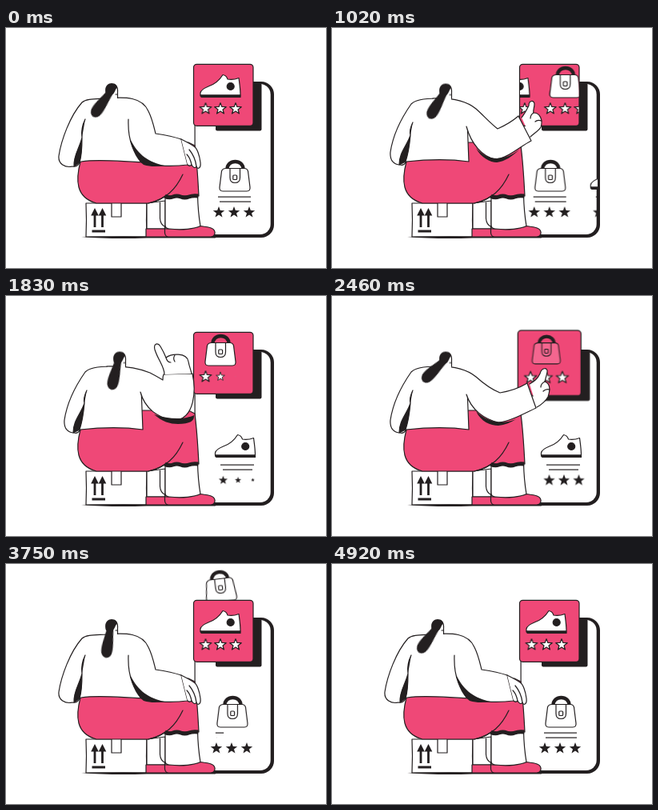
An HTML page without scripts that plays this animation: 400 px wide and 300 px high, repeating every 4.95 s.

```html
<!DOCTYPE html>
<html lang="en">
<head>
<meta charset="utf-8">
<title>Shopping by phone</title>
<style>
html, body { margin: 0; width: 100%; height: 100%; overflow: hidden; background: #fff; }
svg { display: block; width: 100vw; height: 100vh; --pink: #ef4877; --ink: #231f20; }
.o { stroke: var(--ink); stroke-width: 1.2; stroke-linejoin: round; stroke-linecap: round; }
.w { fill: #fff; }
.p { fill: var(--pink); }
.k { fill: var(--ink); }
.n { fill: none; }
.a { animation: 4.95s ease-in-out infinite both; }
.box { transform-box: fill-box; transform-origin: center; }
.d1 { animation-delay: .1s; }
.d2 { animation-delay: .2s; }
.q1 { animation-delay: .04s; }
.q2 { animation-delay: .08s; }

/* person */
.torso { animation-name: torso; }
@keyframes torso {
  0%, 4%, 74%, 100% { d: path("M127 88C112 89 101 88 95 93C80 110 69 140 66 160C65 170 74 175 83 173C88 174 90 172 92 168L94 167C120 163 150 168 178 168L172 110C168 97 155 90 127 88Z"); }
  20%, 54% { d: path("M130 88C115 88 104 90 99 95C85 115 76 135 73 155C72 166 78 171 85 171C89 172 91 170 92 168L93 167C120 164 150 164 171 167L169 115C168 100 158 91 130 88Z"); }
  64.2% { d: path("M128 88C114 88 103 90 97 96C85 112 77 138 75 160C74 172 78 178 86 178C90 178 92 174 93 170L94 170C120 161 150 163 174 174L169 112C168 98 157 90 128 88Z"); }
}
.fold { animation-name: fold; }
@keyframes fold {
  0%, 4%, 74%, 100% { d: path("M99 114C95 122 94 130 95 137C92 150 84 160 85 173L92 168C95 158 95 148 95 137"); }
  20%, 54% { d: path("M101 118C98 124 97 130 98 134C94 147 84 155 84 171L92 167C96 155 97 145 98 134"); }
  64.2% { d: path("M98 120C95 126 94 136 95 144C92 152 84 162 84 177L92 169C95 160 95 152 95 144"); }
}
.head { animation-name: head; }
@keyframes head {
  0%, 4%, 74%, 100% { transform: none; }
  20%, 54% { transform: translate(10px, .5px); }
  64.2% { transform: translate(6.5px, 4px); }
}
.tail { animation-name: tail; }
@keyframes tail {
  0%, 100% { transform: rotate(35deg); }
  10% { transform: rotate(14deg); }
  20.6% { transform: rotate(30deg); }
  37% { transform: rotate(13deg); }
  49.7% { transform: rotate(45deg); }
  64.2% { transform: rotate(49deg); }
  75.8% { transform: rotate(8deg); }
  88% { transform: rotate(30deg); }
}
.sleeve { animation-name: sleeve; }
@keyframes sleeve {
  0%, 3%, 72.7%, 100% { d: path("M125 88C150 86 170 86 178 104C183 114 185 124 187 132C200 134 210 136 219 139L227 171C205 174 180 172 172 168C160 158 152 140 153 114"); }
  12.1% { d: path("M126 88C150 87 168 91 181 101C192 110 204 117 214 122C230 120 246 114 258 107L266 135C245 145 222 160 206 162C188 158 174 144 168 123"); }
  20.6% { d: path("M126 88C150 87 168 91 180 101C190 110 198 119 207 126C216 122 225 117 233 110L249 141C235 148 220 163 204 164C188 161 174 145 168 123"); }
  28.3%, 39.4% { d: path("M126 88C150 87 168 91 180 96C186 99 191 102 196 105C196 102 196 100 197 98L233 97C237 115 238 155 208 156C190 151 174 142 168 120"); }
  45.5%, 53.5% { d: path("M126 88C150 87 168 91 180 101C190 110 200 117 210 121C222 119 234 115 244 109L255 140C240 147 222 157 208 158C190 154 174 142 168 123"); }
  64.2% { d: path("M125 88C150 87 170 92 179 107C184 115 187 123 189 133C202 131 215 128 229 123L237 158C222 164 205 173 190 174C178 171 171 148 168 122"); }
}
.shade { animation-name: shade; }
@keyframes shade {
  0%, 3%, 72.7%, 100% { d: path("M155 138C158 155 165 166 172 171C182 174 190 173 198 172C180 168 165 160 155 138Z"); }
  12.1%, 20.6% { d: path("M180 150C186 162 198 168 206 168C216 167 226 160 234 152C216 166 196 168 180 150Z"); }
  28.3%, 39.4% { d: path("M185 148C195 157 205 160 215 160C230 160 236 156 235 149C225 154 205 155 185 148Z"); }
  45.5%, 53.5% { d: path("M180 144C186 157 198 162 208 162C216 161 224 158 230 154C216 160 196 160 180 144Z"); }
  64.2% { d: path("M173 155C176 168 182 177 188 178C196 178 202 174 208 170C196 174 182 174 173 155Z"); }
}
.hand { animation-name: hand; }
@keyframes hand {
  0%, 3%, 72.7%, 100% { d: path("M219 139C225 142 231 145 235 148C239 150 242 160 243 168C244 176 239 177 238 173C237 176 233 174 232 171C230 173 228 172 227 171"); }
  12.1% { d: path("M259 108C261 104 264 101 267 97C270 90 276 91 275 96C274 100 272 103 272 106C280 106 284 115 280 124C277 128 271 131 266 133"); }
  20.6% { d: path("M237 112C241 107 244 101 246 97C246 90 253 90 253 95C253 100 251 103 252 106C260 106 264 115 261 124C259 128 252 132 248 136"); }
  28.3%, 39.4% { d: path("M198 98C198 88 190 80 186 67C184 59 190 58 193 63C196 68 198 72 200 77C206 72 226 70 228 82C229 88 231 92 232 97"); }
  45.5%, 53.5% { d: path("M247 110C252 107 257 104 260 97C262 89 270 89 269 95C268 100 267 103 266 107C274 110 272 120 270 126C268 130 262 136 256 139"); }
  64.2% { d: path("M231 126C234 122 238 119 240 117C244 111 249 115 246 120C244 123 243 126 244 129C252 130 254 140 252 150C250 157 243 160 238 163"); }
}
.knuckle { animation-name: knuckle; }
@keyframes knuckle {
  0%, 3%, 72.7%, 100% { d: path("M229 152C234 158 237 165 238 173M226 158C230 162 231 166 232 171"); }
  12.1% { d: path("M272 106C269 108 267 110 267 113M281 116C278 115 275 115 273 117"); }
  20.6% { d: path("M252 106C249 108 248 110 248 113M262 116C259 115 256 115 254 117"); }
  28.3%, 39.4% { d: path("M200 77C201 81 203 83 206 83M211 74C209 77 209 79 211 82"); }
  45.5%, 53.5% { d: path("M266 107C262 109 261 111 261 114M272 117C269 116 266 117 264 119"); }
  64.2% { d: path("M244 129C241 128 239 128 237 130M252 139C248 137 245 138 242 140"); }
}
.crate { animation-name: crate; }
@keyframes crate {
  0%, 60%, 71%, 100% { d: path("M100 219Q101 240 100 261L176 261Q175 240 176 219Z"); }
  64.2% { d: path("M101 220Q95 240 100 261L176 261Q182 240 175 220Z"); }
}

/* card */
.card { transform-origin: 272px 84px; animation-name: press; }
@keyframes press {
  0%, 44.5%, 55%, 80%, 88%, 100% { transform: none; }
  48.5%, 51.7% { transform: scale(1.06); }
  84% { transform: scale(1.025); }
}
.shoe { animation-name: shoe; transform-origin: 268px 75px; }
@keyframes shoe {
  0%, 12.1% { transform: none; animation-timing-function: ease-in; }
  20.6% { transform: translate(-46px); animation-timing-function: ease-out; }
  27%, 67% { transform: translate(-69px); animation-timing-function: step-end; }
  67.1% { transform: scale(0); }
  73.5%, 100% { transform: none; }
}
.rateA { animation-name: rateA; }
@keyframes rateA {
  0%, 12.1% { transform: none; animation-timing-function: ease-in; }
  20.6% { transform: translate(-46px); animation-timing-function: ease-out; }
  27%, 66% { transform: translate(-69px); animation-timing-function: step-end; }
  66.1%, 100% { transform: none; }
}
.bag { animation-name: bag; }
@keyframes bag {
  0%, 12.1% { transform: translate(69px); animation-timing-function: ease-in; }
  20.6% { transform: translate(23.5px); animation-timing-function: ease-out; }
  27%, 65.3% { transform: none; animation-timing-function: step-end; }
  65.4%, 100% { transform: translate(69px); }
}
.rateB { animation-name: rateB; }
@keyframes rateB {
  0%, 12.1% { transform: translate(69px); animation-timing-function: ease-in; }
  20.6% { transform: translate(23.5px); animation-timing-function: ease-out; }
  27%, 72% { transform: none; animation-timing-function: step-end; }
  72.1%, 100% { transform: translate(69px); }
}
.tint { animation-name: tint; transform-origin: 268px 70px; }
@keyframes tint {
  0%, 45.5%, 57%, 100% { fill: #fff; transform: none; }
  48.5%, 52% { fill: #f4668f; transform: scale(.87); }
}
.wave { animation-name: wave; }
@keyframes wave {
  0%, 30.3%, 36.4%, 61.2%, 95%, 100% { transform: none; }
  32.3%, 66.7%, 94% { transform: scale(0); }
}
.blink { animation-name: blink; }
@keyframes blink {
  0%, 31%, 39%, 100% { transform: none; }
  33% { transform: scale(0); }
}
.pop { animation-name: pop; }
@keyframes pop {
  0%, 30%, 71.2%, 100% { transform: none; }
  31%, 68.7% { transform: scale(0); }
}
.rise { animation-name: rise; transform-origin: 268px 70px; }
@keyframes rise {
  0%, 65.2% { visibility: hidden; transform: none; }
  65.3% { visibility: visible; transform: none; animation-timing-function: ease-out; }
  70.7% { visibility: visible; transform: translateY(-45px) rotate(-4deg); animation-timing-function: step-end; }
  70.8%, 100% { visibility: hidden; transform: none; }
}
.drop { animation-name: drop; transform-origin: 268px 70px; }
@keyframes drop {
  0%, 70.6% { visibility: hidden; transform: translateY(-45px) rotate(-4deg); }
  70.7% { visibility: visible; transform: translateY(-45px) rotate(-4deg); animation-timing-function: ease-in; }
  75.8% { visibility: visible; transform: translateY(-40px) rotate(-7deg); animation-timing-function: ease-in; }
  80.8% { visibility: visible; transform: translateY(4px); animation-timing-function: step-end; }
  80.9%, 100% { visibility: hidden; transform: none; }
}

/* phone list */
.first { animation-name: first; }
@keyframes first {
  0%, 16.2% { transform: none; animation-timing-function: ease-in; }
  20.6% { transform: translate(-13px); animation-timing-function: ease-out; }
  30.3%, 66.7% { transform: translate(-77px); animation-timing-function: cubic-bezier(.4, 0, .2, 1); }
  78.8%, 100% { transform: none; }
}
.second { animation-name: second; }
@keyframes second {
  0%, 16.2% { transform: translate(77px); animation-timing-function: ease-in; }
  20.6% { transform: translate(62px); animation-timing-function: ease-out; }
  30.3%, 66.7% { transform: none; animation-timing-function: cubic-bezier(.4, 0, .2, 1); }
  78.8%, 100% { transform: translate(77px); }
}
.line { transform-box: fill-box; transform-origin: left; animation-name: line; }
@keyframes line {
  0%, 40%, 80%, 100% { transform: none; }
  41%, 73.5% { transform: scaleX(0); }
}
</style>
</head>
<body>
<svg viewBox="0 0 400 300">
  <defs>
    <path id="star" d="M0-7.400L1.900-2.500L7.200-2.300L3 1L4.500 6L0 3.100L-4.500 6L-3 1L-7.200-2.300L-1.900-2.500Z"/>
    <g id="sneaker" class="o">
      <path class="w" d="M243 84V81C244 77 248 75 253 73C262 70 267 65 271 58.5C274 59 276 61 277 64C282 65 287 64 291 62.5C292 70 293 76 293 84Z"/>
      <path class="k" d="M243 84H293V86.5H244.500Q243 86 243 84Z"/>
      <circle class="k" cx="280.700" cy="73" r="4.500"/>
    </g>
    <g id="purse" class="o">
      <path class="n" style="stroke-width:4.500;stroke-linecap:butt" d="M258.500 60C258 46.500 279 46.500 278.500 60"/>
      <path d="M257 58.500H280Q283.500 58.500 284.500 62L287 82Q287.500 87 283 87H253Q248.500 87 249 82L251.500 62Q252.500 58.500 257 58.500Z"/>
      <path class="n" d="M262 58.500V70Q262 76.500 268.200 76.500Q274.500 76.500 274.500 70V58.500"/>
      <rect class="n" x="265.800" y="67" width="4.800" height="5.500" rx="1"/>
    </g>
    <clipPath id="cardClip"><rect x="235" y="45.500" width="73.500" height="76" rx="4"/></clipPath>
    <clipPath id="faceClip"><rect x="237" y="71" width="95" height="187" rx="12"/></clipPath>
  </defs>

  <!-- phone -->
  <rect class="k" x="235.500" y="67" width="99.500" height="195" rx="16"/>
  <rect class="w" x="236.700" y="70" width="94" height="188" rx="13"/>
  <g clip-path="url(#faceClip)">
    <g class="a first">
      <use href="#purse" class="w" x="18" y="117"/>
      <rect class="k a line" x="265" y="210.500" width="41" height="1.200"/>
      <rect class="k a line d1" x="267" y="216.500" width="39" height="1.200"/>
      <g class="k">
        <use href="#star" x="266" y="230.500"/><use href="#star" x="285" y="230.500"/><use href="#star" x="304" y="230.500"/>
      </g>
    </g>
    <g class="a second">
      <use href="#sneaker" x="18.500" y="115"/>
      <rect class="k" x="268" y="210.500" width="42" height="1.200"/>
      <rect class="k" x="271" y="216.500" width="37" height="1.200"/>
      <g class="k">
        <g transform="translate(271.500 230.500)"><use href="#star" class="a box blink"/></g>
        <g transform="translate(290 230.500)"><use href="#star" class="a box blink q1"/></g>
        <g transform="translate(308.500 230.500)"><use href="#star" class="a box blink q2"/></g>
      </g>
    </g>
  </g>

  <!-- card -->
  <g class="a drop"><use href="#purse" class="w"/></g>
  <g class="a card">
    <rect class="k" x="262" y="69" width="57.500" height="59.500" rx="2"/>
    <rect class="p o" x="234.500" y="45.300" width="74.500" height="77" rx="4"/>
    <g clip-path="url(#cardClip)">
      <g class="a shoe"><use href="#sneaker"/></g>
      <g class="a rateA w o">
        <g transform="translate(249.500 101)"><use href="#star" class="a box pop"/></g>
        <g transform="translate(268 101)"><use href="#star" class="a box pop d1"/></g>
        <g transform="translate(287 101)"><use href="#star" class="a box pop d2"/></g>
      </g>
      <g class="a bag"><g class="a tint"><use href="#purse"/></g></g>
      <g class="a rateB w o">
        <g transform="translate(249.500 101)"><use href="#star" class="a box wave"/></g>
        <g transform="translate(268 101)"><use href="#star" class="a box wave d1"/></g>
        <g transform="translate(287 101)"><use href="#star" class="a box wave d2"/></g>
      </g>
    </g>
  </g>
  <g class="a rise"><use href="#purse" class="w"/></g>

  <!-- crate -->
  <path class="a crate w o" d="M100 219Q101 240 100 261L176 261Q175 240 176 219Z"/>
  <path class="w o" d="M132 219V236H144V219"/>
  <path class="o n" style="stroke-width:2.800;stroke-linecap:butt" d="M111 249V230M120.500 249V230M107.500 254H124"/>
  <path class="k" d="M111 225L115.800 234.500H106.200ZM120.500 225L125.300 234.500H115.700Z"/>
  <path class="k" d="M94 261Q130 260 176 260.500L262 261V262.500H176Q130 264 94 261Z"/>

  <!-- legs -->
  <path class="w o" d="M176 219V251H199V216Z"/>
  <path class="n o" d="M192.500 218V238Q193 246 199 248.500"/>
  <path class="p o" d="M175 251H210C225 252 236 250 243 247.500C255 249 262 250 261 257Q260 261 256 261H175Z"/>
  <path class="w o" d="M199 209V246Q199 251 204 251C220 253 236 251 243 247.500Q240 230 239.500 209Z"/>
  <path class="n o" d="M198.500 248V256Q199 260 202 261"/>
  <path class="p o" d="M93 167C87 190 87 212 113 219H178C189 217 195 213 199 210H241C240 190 239 170 236 147L228 143H171Z"/>
  <path class="n o" d="M178 219C200 214 212 202 221 183"/>
  <path class="n o" style="stroke-width:5;stroke-linecap:butt" d="M198.500 210q5 3 10 1t10 0t10 0t12-1"/>

  <!-- upper body -->
  <path class="a torso w o" d="M127 88"/>
  <path class="a fold k o" d="M99 114"/>
  <path class="a sleeve w o" d="M125 88"/>
  <path class="a shade k" d="M155 138"/>
  <path class="a hand w o" d="M219 139"/>
  <path class="a knuckle n o" d="M229 152"/>
  <g class="a head">
    <path class="w" d="M127 80H139V90H127Z"/>
    <path class="w o" d="M131 71C138 69 140 74 139.500 80V87.500"/>
    <path class="n o" d="M137 83H139.500"/>
    <path class="k" d="M125 83C122 74 127 69 132 69C137 69 139 72 139 75C136 76 137 82 131 84Z"/>
    <g transform="translate(130.500 80)">
      <path class="a tail k" d="M-4-2C-5 12-9 24-7 32C-4 40 4 39 6 32C8 23 4 10 4-2Z"/>
    </g>
  </g>
</svg>
</body>
</html>
```
